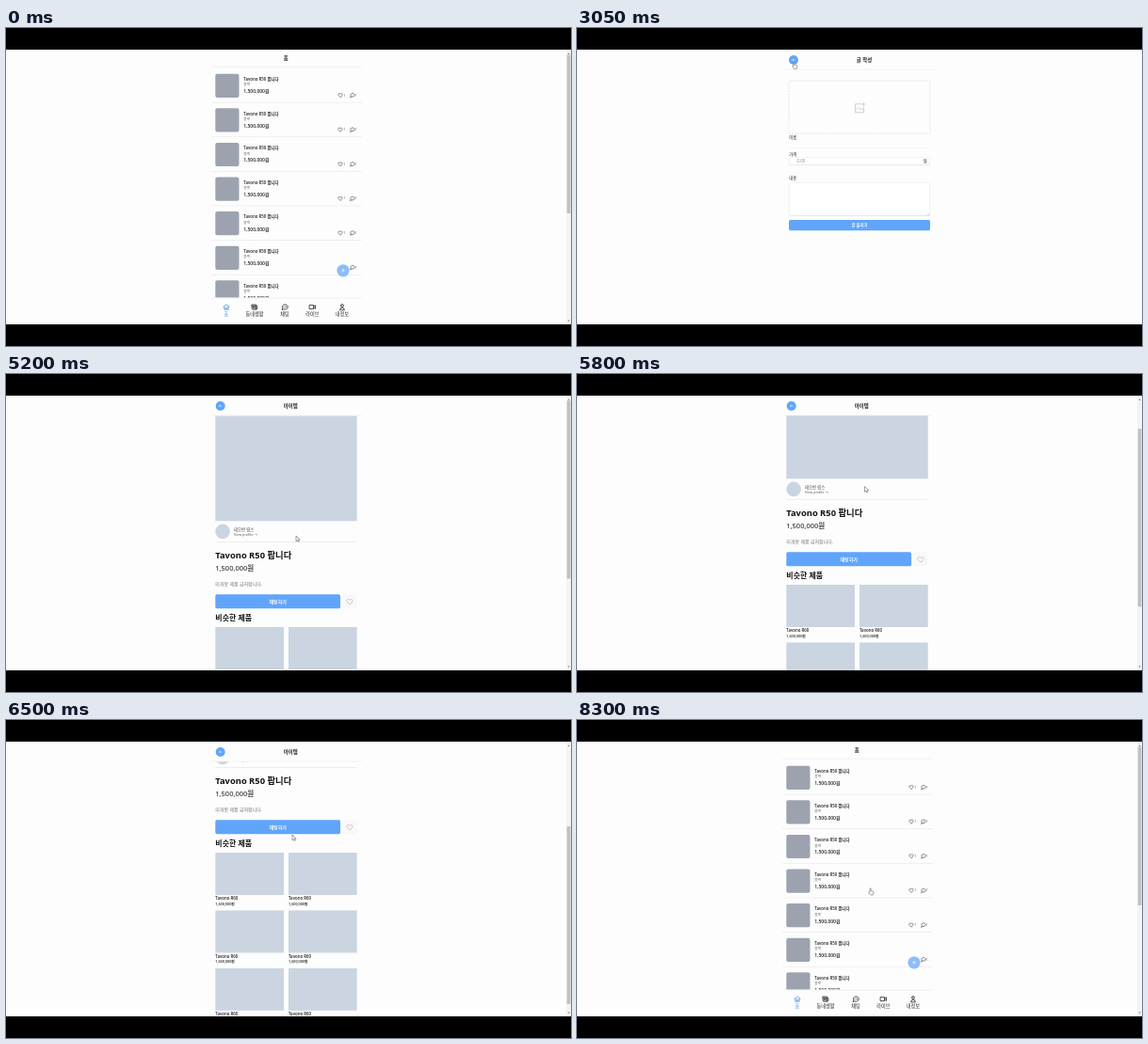
An HTML page for the animation above (8350 ms loop, 600 px wide and 338 px high).

```html
<!DOCTYPE html>
<html lang="ko">
<head>
<meta charset="utf-8">
<style>
html, body { margin: 0; width: 100%; height: 100%; overflow: hidden; background: #000; }
svg { display: block; width: 600px; height: 338px; font-family: 'Open Sans', 'Noto Sans CJK KR', 'Noto Sans CJK', sans-serif; }
</style>
</head>
<body>
<svg id="stage" viewBox="0 0 600 338"></svg>
<script>
const LOOP = 8350, BLUE = '#60a5fa', SLATE = '#cbd5e1';
const range = n => [...Array(n).keys()];

const text = (x, cy, size, str, weight = 400, fill = '#222', anchor = 'start') =>
  `<text x="${x}" y="${cy + size * .36}" font-size="${size}" font-weight="${weight}" fill="${fill}" text-anchor="${anchor}">${str}</text>`;
const rect = (x, y, w, h, fill, r = 0, extra = '') =>
  `<rect x="${x}" y="${y}" width="${w}" height="${h}" rx="${r}" fill="${fill}" ${extra}/>`;
const circle = (x, y, r, fill) => `<circle cx="${x}" cy="${y}" r="${r}" fill="${fill}"/>`;
const icon = (x, y, d, color = '#222', width = .7, scale = 1) =>
  `<path transform="translate(${x} ${y}) scale(${scale})" d="${d}" fill="none" stroke="${color}" stroke-width="${width}" stroke-linecap="round" stroke-linejoin="round"/>`;
const rule = (x, y, color = '#e7e7e9', w = 160) => rect(x, y - .25, w, .6, color);

const HEART = 'M0 2.2L-2.1 .1C-3.3-1.2-1.3-3.2 0-1.4C1.3-3.2 3.3-1.2 2.1 .1Z';
const BUBBLE = 'M-2 2.2L-1.6 .9A2.1 1.9 0 1 1-.5 1.7Z';
const ARROW = 'M1.4 0H-1.4M-.5-.9L-1.4 0L-.5 .9';

const header = (x, titleX, lineY, title, back) =>
  rect(x - 1, 23, 162, lineY - 23, '#fdfdfd') + rule(x, lineY) +
  text(titleX, lineY === 41 ? 32.5 : 34, 5.4, title, 600, '#222', 'middle') +
  (back ? circle(back, 34, 5, BLUE) + icon(back, 34, ARROW, '#fff', .5) : '');

function listRow(i) {
  const y = 48.7 + i * 36.6;
  return rect(222.3, y, 25.2, 25.2, '#9ca3af', 2) +
    text(252.3, y + 5.8, 4.375, 'Tavono R50 팝니다', 600) +
    text(252.3, y + 11.4, 3.75, '블랙', 400, '#777') +
    text(252.3, y + 18.7, 5, '1,500,000원', 600) +
    (i === 5 ? '' : icon(355, y + 22.8, HEART, '#333', .6, .9) + text(358.3, y + 22.6, 3.75, '1', 400, '#555')) +
    icon(367.8, y + 22.7, BUBBLE, '#333', .6) + text(370.4, y + 22.6, 3.75, '1', 400, '#555') +
    rule(218, y + 30.4);
}

function tabs() {
  const items = [
    [234, '홈', 'M-3 0L0-3L3 0M-2.1-.8V2.8H-.7V.7H.7V2.8H2.1V-.8'],
    [264, '동네생활', 'M-2.8-2.5H1.7V2.5H-2.2Q-2.8 2.5-2.8 1.9ZM1.7-1H2.8V1.7Q2.8 2.5 1.7 2.5M-1.7-1.4H.5V0H-1.7ZM-1.7 1.2H.5'],
    [296, '채팅', 'M-2.8 2.8L-2.4 1.1A3 2.6 0 1 1-1 2.3ZM-1.2-.1H-1.1M.1-.1H.2M1.4-.1H1.5'],
    [325.5, '라이브', 'M-3-2H1V2H-3ZM1-.4L3-1.8V1.8L1 .4'],
    [357, '내정보', 'M-1.4-1.6A1.4 1.4 0 1 1 1.4-1.6A1.4 1.4 0 1 1-1.4-1.6M-2.4 2.8Q-2.2 .6 0 .6Q2.2 .6 2.4 2.8Z']
  ];
  return rect(217, 286.5, 162, 28.5, '#fdfdfd') + rule(218, 287) +
    items.map(([x, label, d], i) => {
      const color = i ? '#222' : '#4a94e8';
      return icon(x, 296.6, d, color, .8) + text(x, 304.2, 5.2, label, 400, color, 'middle');
    }).join('');
}

const home = range(7).map(listRow).join('') + header(218, 297.3, 41, '홈') + tabs() +
  circle(358, 257.8, 6.6, '#8dbdf8') + icon(358, 257.8, 'M-1.5 0H1.5M0-1.5V1.5', '#fff', .65);

const field = (y, h) => rect(225.2, y + .5, 149.6, h, '#d9dadd', 1.5) +
  rect(225.2, y, 149.6, h, '#fff', 1.5, 'stroke="#e2e4e7" stroke-width=".4"');

const write = header(220, 305, 44, '글 작성', 230) +
  rect(225, 56.3, 150, 56, 'none', 1.5, 'stroke="#d3d5d9" stroke-width=".6" stroke-dasharray="1.8 1.2"') +
  icon(300, 84.8, 'M1.8-4H-4.6V5H4.6V-1M-4.6 3L-1.4-.2L1 2.2L2.5 .9L4.6 3M4.4-5.4V-2.2M2.8-3.8H6', '#c3c6cc', .8) +
  text(225.2, 116.6, 4.375, '이름', 500) + rule(225, 127.5, '#f0f0f1', 150) +
  text(225.2, 134, 4.375, '가격', 500) + field(137.5, 8) +
  text(233.5, 141.5, 4.375, '0.00', 400, '#888') + text(367.8, 141.5, 4.375, '원', 500) +
  text(225.2, 159.6, 4.375, '내용', 500) + field(164.4, 35) +
  icon(373, 197.8, 'M-1 1L1-1M.2 1L1 .2', '#888', .3) +
  rect(225, 204, 150, 11.2, BLUE, 1.6) + text(300, 209.5, 4.375, '글 올리기', 600, '#fff', 'middle');

function card(i) {
  const x = i % 2 ? 300 : 222.3, y = 269 + (i >> 1) * 61.4;
  return rect(x, y, 72.7, 45, SLATE) +
    text(x, y + 48.8, 4.375, 'Tavono R60', 600) + text(x, y + 54.4, 3.75, '1,600,000원', 600);
}

const detail = `<g id="scroll">` +
  rect(222.3, 44.5, 150.4, 111.8, SLATE) + circle(230.1, 167.4, 7.8, SLATE) +
  text(242, 165.2, 4.375, '테오반 림스', 500, '#444') + text(242, 170.8, 3.75, 'View profile →', 400, '#555') +
  rule(222.3, 178.6, '#e3e3e6', 150) +
  text(222.3, 192.8, 9.375, 'Tavono R50 팝니다', 700, '#111') +
  text(222.3, 206.7, 7.5, '1,500,000원', 600, '#444') +
  text(222.3, 223, 5, '미개봉 제품 급처합니다.', 400, '#777') +
  rect(222.3, 234.3, 132.8, 14.9, BLUE, 1.6) + text(288.7, 241.7, 5, '채팅하기', 600, '#fff', 'middle') +
  rect(357.5, 234.3, 15.2, 14.9, '#f8f8f9', 1.6) + icon(365, 242.1, HEART, '#b5b9c0', .6, 1.25) +
  text(222.3, 259.2, 8, '비슷한 제품', 700, '#111') + range(6).map(card).join('') +
  `</g>` + header(218, 302.3, 44, '아이템', 227.7);

const bar = rect(595, 23, 5, 292, '#f4f4f4') +
  '<path d="M596.3 28L597.5 26.5L598.7 28ZM596.3 310.6L597.5 312.1L598.7 310.6Z" fill="#777"/>' +
  rect(595.6, 29, 3.8, 169, '#c1c1c1', 0, 'id="thumb"');

const stage = document.getElementById('stage');
stage.innerHTML = `<clipPath id="view"><path d="M0 23H600V315H0Z"/></clipPath>` +
  rect(0, 0, 600, 338, '#000') + rect(0, 23, 600, 292, '#fdfdfd') +
  `<g clip-path="url(#view)"><g id="home">${home}</g><g id="write">${write}</g><g id="detail">${detail}</g>` +
  `<g id="bar">${bar}</g><g id="cursor" fill="#fff" stroke="#444" stroke-width=".5" stroke-linejoin="round">` +
  `<path id="arrow" d="M0 0V5.8L1.4 4.6L2.3 6.5L3.2 6.1L2.3 4.2H4.1Z"/>` +
  `<path id="hand" d="M1 .5Q1.6-.2 2.1 .6V3L4.6 3.6Q5.1 3.8 5 4.6L4.4 7.3H1.5L-.3 4.7Q0 3.8 1 4.7Z"/></g></g>`;
const el = id => document.getElementById(id);

const pages = [[0, 'home'], [950, 'write'], [3250, 'home'], [4900, 'detail'], [7900, 'home']];
const hands = [[750, 950], [2950, 3250], [4600, 4900], [8250, LOOP]];
// [time, values...]
const scrollKeys = [[5450, 0], [5800, 45], [6000, 62.5], [6100, 62.5], [6500, 128], [6800, 139]];
const cursorKeys = [
  [50, 594, 294], [500, 430, 272], [850, 358, 256], [2000, 361, 256.5], [2250, 377, 205],
  [2550, 300, 95], [2800, 240, 48], [3050, 229, 36], [3950, 229, 36], [4150, 274.5, 84],
  [4450, 345, 292], [4700, 308, 172], [5200, 308, 172], [5450, 305.5, 119.5], [6000, 305.5, 119.5],
  [6300, 304, 122], [6900, 304, 122], [7050, 282, 102], [7250, 310.5, 154], [7650, 310.5, 154], [8150, 310, 178.5]
];

function sample(keys, t) {
  const next = keys.findIndex(k => k[0] > t);
  if (next < 0) return keys.at(-1).slice(1);
  if (!next) return keys[0].slice(1);
  const a = keys[next - 1], b = keys[next], p = (t - a[0]) / (b[0] - a[0]);
  return a.slice(1).map((v, i) => v + (b[i + 1] - v) * p);
}
const show = (id, on) => el(id).setAttribute('display', on ? 'inline' : 'none');

function draw(now) {
  const t = Math.floor(now % LOOP / 50) * 50;
  const page = pages.findLast(p => p[0] <= t)[1];
  ['home', 'write', 'detail'].forEach(id => show(id, id === page));
  show('bar', page !== 'write');

  const offset = page === 'detail' ? sample(scrollKeys, t)[0] : 0;
  el('scroll').setAttribute('transform', `translate(0 ${-offset})`);
  el('thumb').setAttribute('y', 28.5 + offset * .66);
  el('thumb').setAttribute('height', page === 'detail' ? 189 : 168.5);

  const hand = hands.some(([a, b]) => t >= a && t < b);
  show('cursor', t >= 50);
  show('hand', hand);
  show('arrow', !hand);
  el('cursor').setAttribute('transform', `translate(${sample(cursorKeys, t)})`);
  requestAnimationFrame(draw);
}
requestAnimationFrame(draw);
</script>
</body>
</html>
```
